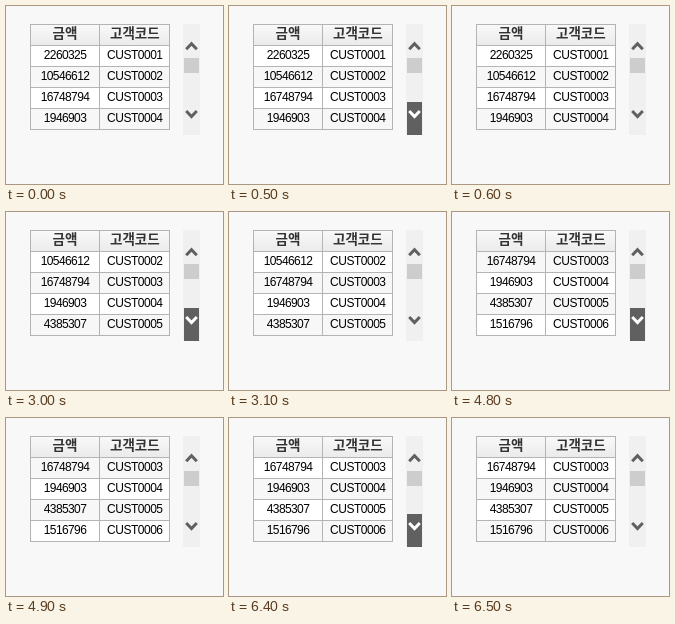
These frames come from a looping animation (217x178 px, 8 s). An HTML page with a canvas:

```html
<!DOCTYPE html>
<html lang="ko">
<head>
<meta charset="utf-8">
<style>
html, body { margin: 0; width: 100%; height: 100%; overflow: hidden; background: #f8f8f8; }
canvas { display: block; }
</style>
</head>
<body>
<canvas id="stage" width="217" height="178"></canvas>
<script>
const ctx = document.getElementById('stage').getContext('2d');
const LOOP = 8000;
const PRESSES = [500, 3000, 4800, 6400];
const PRESS_TIME = 100;
const AMOUNTS = [2260325, 10546612, 16748794, 1946903, 4385307, 1516796];
const TOP = 18;
const ROW = 21;
const COLUMNS = [59, 128.8];

function box(x, y, w, h, color) {
  ctx.fillStyle = color;
  ctx.fillRect(x, y, w, h);
}

function label(text, x, y, font, spacing) {
  ctx.font = font;
  ctx.letterSpacing = spacing;
  ctx.fillText(text, x, y);
}

function chevron(y, dy, color) {
  ctx.strokeStyle = color;
  ctx.lineWidth = 3;
  ctx.beginPath();
  ctx.moveTo(180.2, y);
  ctx.lineTo(185.5, y + dy);
  ctx.lineTo(190.8, y);
  ctx.stroke();
}

function drawTable(first, grayFirst) {
  const shade = ctx.createLinearGradient(0, TOP, 0, TOP + ROW);
  shade.addColorStop(0, '#f9f9f9');
  shade.addColorStop(1, '#ebebeb');
  box(24, TOP, 140, ROW, shade);
  for (let i = 1; i <= 4; i++) {
    const gray = (i % 2 === 1) === grayFirst;
    box(24, TOP + i * ROW, 140, ROW, gray ? '#f7f7f7' : '#ffffff');
  }
  for (let i = 0; i <= 5; i++) box(24, TOP + i * ROW, 140, 1, '#b4b4b4');
  for (const x of [24, 93, 163]) box(x, TOP, 1, 5 * ROW + 1, '#b4b4b4');

  ctx.textAlign = 'center';
  ctx.fillStyle = '#333';
  const headFont = 'bold 13.5px "Noto Sans CJK KR", "Noto Sans CJK", sans-serif';
  label('금액', COLUMNS[0], 32, headFont, '0px');
  label('고객코드', COLUMNS[1], 32, headFont, '0px');

  ctx.fillStyle = '#000';
  const cellFont = '12px "Liberation Sans", Arial, sans-serif';
  for (let i = 0; i < 4; i++) {
    const row = first + i;
    const y = TOP + (i + 1) * ROW + 14;
    label(String(AMOUNTS[row]), COLUMNS[0], y, cellFont, '-0.6px');
    label('CUST000' + (row + 1), COLUMNS[1], y, cellFont, '-0.5px');
  }
}

function drawScrollbar(thumbY, pressed) {
  box(177, 18, 17, 111, '#f0f0f0');
  box(178, thumbY, 15, 15, '#cdcdcd');
  if (pressed) box(178, 96, 15, 33, '#606060');
  chevron(43.2, -5.5, '#606060');
  chevron(105, 5.5, pressed ? '#ffffff' : '#606060');
}

function render(now) {
  const t = now % LOOP;
  const first = t < 3000 ? 0 : t < 4800 ? 1 : 2;
  const pressed = PRESSES.some(p => t >= p && t < p + PRESS_TIME);
  box(0, 0, 217, 178, '#f8f8f8');
  drawTable(first, t >= 4800 && t < 6400);
  drawScrollbar(t < 4900 ? 52 : 53, pressed);
}

const start = performance.now();
function tick() {
  render(performance.now() - start);
  requestAnimationFrame(tick);
}
tick();
</script>
</body>
</html>
```
